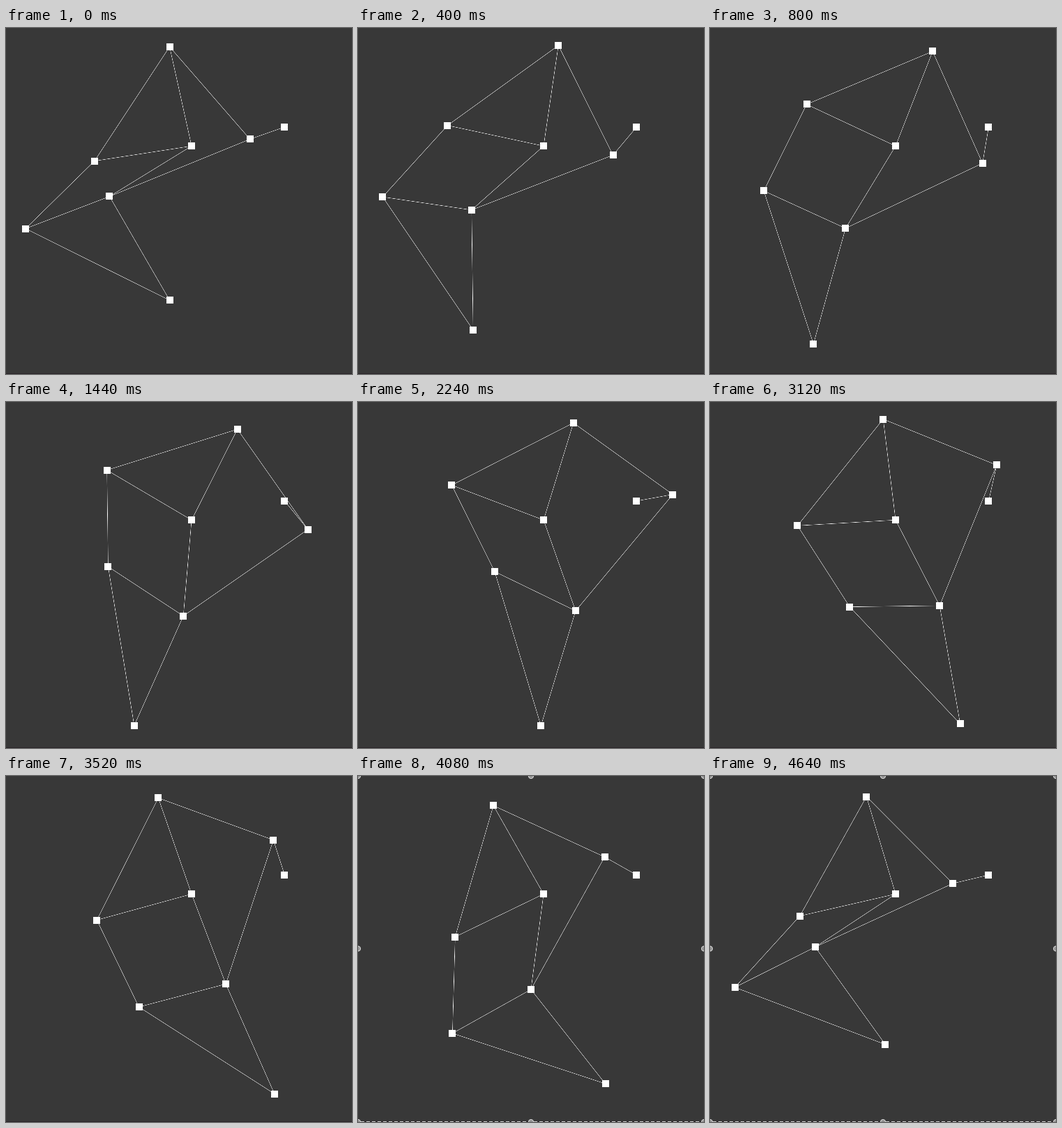
Recreate the animation shown at these times as a matplotlib script. Size 496 by 496 pixels, loop 4720 ms.

```python
import numpy as np
import matplotlib.pyplot as plt
from matplotlib.animation import FuncAnimation
from matplotlib.patches import Circle

SIZE, FRAMES, INTERVAL = 496, 59, 80
START_ANGLE = np.radians(160.6)
SELECTED_FROM = 47

BACKGROUND = np.array([56, 56, 56])
BOTTOM_EDGE = (42, 36, 40)
WHITE = 255
DASH = (205, 205, 205)

# Walking linkage: bar lengths in mechanism units, pivots in pixels
UNIT = 3.512
BAR = {name: UNIT * length for name, length in dict(
    b=41.5, c=39.3, d=40.1, e=55.8, f=39.4, g=36.7,
    h=65.7, i=49.0, j=50.0, k=61.9, m=15.0).items()}
AXLE = np.array([399.2, 141.65])
PIVOT = np.array([265.8, 168.95])

LINKS = ["axle crank", "crank top", "crank knee", "top pivot", "top hip",
         "hip pivot", "pivot knee", "hip heel", "heel knee", "knee foot",
         "heel foot"]


def meet(p, rp, q, rq):
    """Intersection of two circles, on the left when going from p to q."""
    gap = q - p
    dist = np.hypot(*gap)
    u = gap / dist
    along = (rp**2 - rq**2 + dist**2) / (2 * dist)
    off = np.sqrt(max(rp**2 - along**2, 0))
    return p + along * u + off * np.array([u[1], -u[0]])


def joints(n):
    angle = START_ANGLE - 2 * np.pi * n / FRAMES
    crank = AXLE + BAR["m"] * np.array([np.cos(angle), np.sin(angle)])
    top = meet(PIVOT, BAR["b"], crank, BAR["j"])
    knee = meet(crank, BAR["k"], PIVOT, BAR["c"])
    hip = meet(PIVOT, BAR["d"], top, BAR["e"])
    heel = meet(knee, BAR["g"], hip, BAR["f"])
    foot = meet(knee, BAR["i"], heel, BAR["h"])
    return dict(axle=AXLE, pivot=PIVOT, crank=crank, top=top, knee=knee,
                hip=hip, heel=heel, foot=foot)


def draw_line(cover, p, q):
    """Half-pixel-wide smooth line, sampled once per pixel."""
    x0, y0 = np.floor(np.minimum(p, q)).astype(int) - 1
    x1, y1 = np.ceil(np.maximum(p, q)).astype(int) + 1
    y, x = np.mgrid[y0:y1, x0:x1] + 0.25
    dx, dy = (q - p) / np.hypot(*(q - p))
    dist = 2 * np.abs((x - p[0]) * dy - (y - p[1]) * dx)
    spread = abs(dx) + abs(dy)
    alpha = np.clip(((1 + spread) / 2 - dist) / spread, 0, 1)
    box = cover[y0:y1, x0:x1]
    np.maximum(box, alpha, out=box)


def draw_square(cover, p):
    x, y = np.ceil(np.rint(2 * p) / 2).astype(int) - 5
    cover[y:y + 10, x:x + 10] = 1


def render(n):
    cover = np.zeros((SIZE, SIZE))
    points = joints(n)
    for link in LINKS:
        start, end = link.split()
        draw_line(cover, points[start], points[end])
    for p in points.values():
        draw_square(cover, p)
    picture = BACKGROUND + cover[..., None] * (WHITE - BACKGROUND)
    picture[-1] = BOTTOM_EDGE
    if n >= SELECTED_FROM:
        picture[-1, (np.arange(SIZE) + 4) % 8 < 5] = DASH
    return np.rint(picture).astype(np.uint8)


fig = plt.figure(figsize=(SIZE / 100, SIZE / 100), dpi=100)
ax = fig.add_axes([0, 0, 1, 1])
ax.axis("off")
image = ax.imshow(render(0), extent=(0, SIZE, SIZE, 0),
                  interpolation="nearest", aspect="auto")

middle = SIZE / 2
handles = [Circle((x, y), 3.5, fc="#909090", ec="#d4d4d4", lw=0.8,
                  visible=False)
           for x in (0, middle, SIZE) for y in (0, middle - 0.5, SIZE)
           if x != middle or y in (0, SIZE)]
for handle in handles:
    ax.add_patch(handle)


def update(n):
    image.set_data(render(n))
    for handle in handles:
        handle.set_visible(n >= SELECTED_FROM)
    return [image, *handles]


anim = FuncAnimation(fig, update, frames=FRAMES, interval=INTERVAL,
                     repeat=True, repeat_delay=0, blit=False)
plt.show()
```
